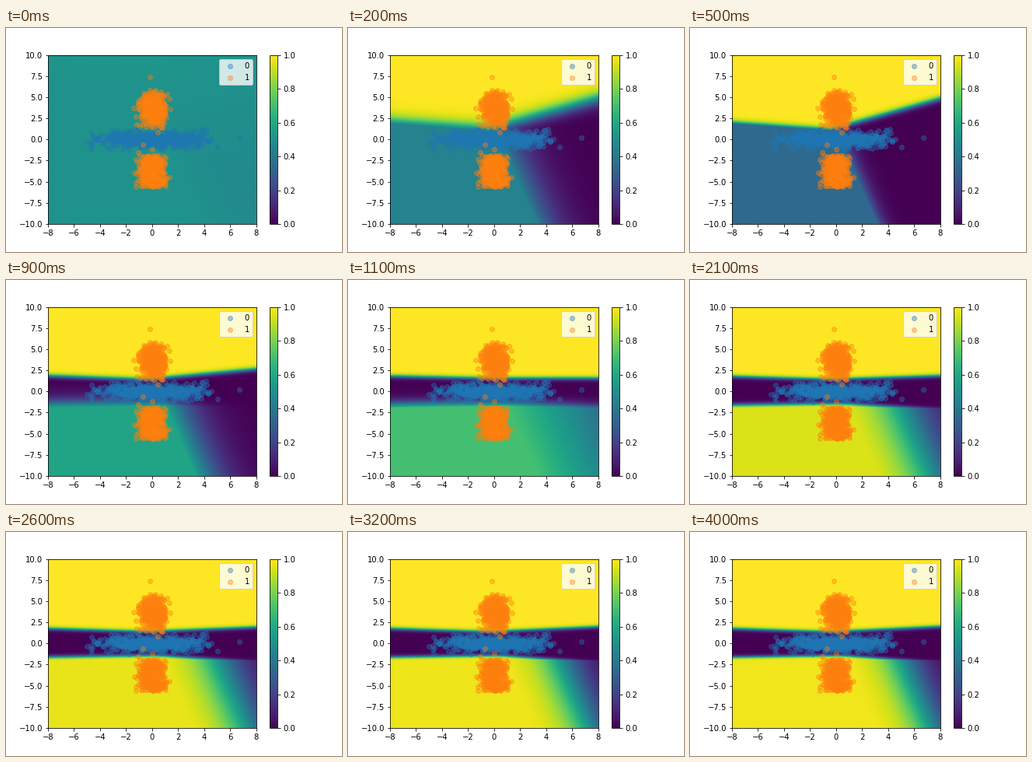
A matplotlib script for the animation above (4.1 s loop, 432 by 288 pixels).

```python
import numpy as np
import matplotlib.pyplot as plt
from matplotlib.animation import FuncAnimation

FRAMES, STEP_MS = 41, 100
SPLIT, BAND = 5, 11      # frames where the fit reaches its second and third shape
SETTLE = 10              # time constant of the final approach, in frames
COLS, ROWS = 268, 217

rng = np.random.default_rng(4)
gx, gy = np.meshgrid(np.linspace(-8, 8, COLS), np.linspace(-10, 10, ROWS))


def stage(frame):
    """Training progress: 0 untrained, 1 split, 2 band found, 3 converged."""
    if frame < BAND:
        return np.interp(frame, [0, SPLIT, BAND], [0, 1, 2])
    full = 1 - np.exp(-(FRAMES - 1 - BAND) / SETTLE)
    return 2 + (1 - np.exp(-(frame - BAND) / SETTLE)) / full


def relu(v):
    return np.maximum(v, 0)


def probability(frame):
    t = stage(frame)

    def at(*values):
        return np.interp(t, range(4), values)

    # Lower half: a plateau that falls off to the right and into the band.
    fan = relu(gx - at(1.2, 1.0, 1.3, 0.95) + 0.28 * (gy + 2.4))
    dip = relu(gy - at(-1.6, -1.6, -1.75, -1.85) + 0.025 * np.abs(gx))
    low = (at(0.05, -0.66, 0.85, 3.9)
           - at(0.035, 2.0, 0.2, 0.91) * fan
           - at(0, 0, 2.7, 9) * dip)

    # Upper half: a steep rise above a bent edge.
    left, mid, right = at(1.9, 1.9, 1.75, 1.7), at(1.1, 1.1, 1.5, 1.3), at(4.8, 4.8, 1.5, 1.95)
    edge = np.interp(gx, [-8, -0.5, 8], [left, mid, right])
    top = at(0.01, 5, 7, 8) * (gy - edge)

    return 1 / (1 + np.exp(-np.clip(np.maximum(low, top), -40, 40)))


def blue_points():
    pts = rng.normal(0, [2.1, 0.47], (540, 2))
    pts = pts[(np.abs(pts[:, 0] + 0.15) < 4.9) & (np.abs(pts[:, 1]) < 1.25)]
    return np.vstack([pts, [(6.7, 0.2), (5.05, -0.85)]])


def orange_points():
    n = 400
    top = np.column_stack([rng.normal(0.05, 0.5, n), rng.normal(3.5, 1.05, n)])
    top = top[(top[:, 1] > 1.35) & (top[:, 1] < 5.9)]
    low = np.column_stack([rng.normal(0, 0.5, n),
                           -5.6 + 3.8 * rng.beta(1.25, 1.25, n)])
    pts = np.vstack([top, low])
    pts = pts[np.abs(pts[:, 0]) < 1.3]
    strays = [(-0.2, 7.4), (-1.45, 3.7), (1.35, 3.6), (-1.2, 1.8),
              (0.45, 0.85), (-0.7, -0.65), (0.0, -1.15), (-1.1, -1.5),
              (-1.25, -5.6), (-1.35, -3.9)]
    return np.vstack([pts, strays])


plt.rcParams["font.family"] = "DejaVu Sans"
fig, ax = plt.subplots(figsize=(6, 4), dpi=72)
fig.subplots_adjust(bottom=0.125)
image = ax.imshow(probability(0), origin="lower", extent=(-8, 8, -10, 10),
                  aspect="auto", cmap="viridis", vmin=0, vmax=1,
                  interpolation="nearest")
fig.colorbar(image, ax=ax)

for label, pts in enumerate([blue_points(), orange_points()]):
    ax.scatter(*pts.T, color=f"C{label}", alpha=0.4, label=str(label))
ax.set(xlim=(-8, 8), ylim=(-10, 10),
       xticks=np.arange(-8, 9, 2), yticks=np.arange(-10, 10.1, 2.5))
ax.legend(loc="upper right")


def update(frame):
    image.set_data(probability(frame))
    return [image]


anim = FuncAnimation(fig, update, frames=FRAMES, interval=STEP_MS,
                     repeat=True, repeat_delay=0, blit=False)
plt.show()
```
